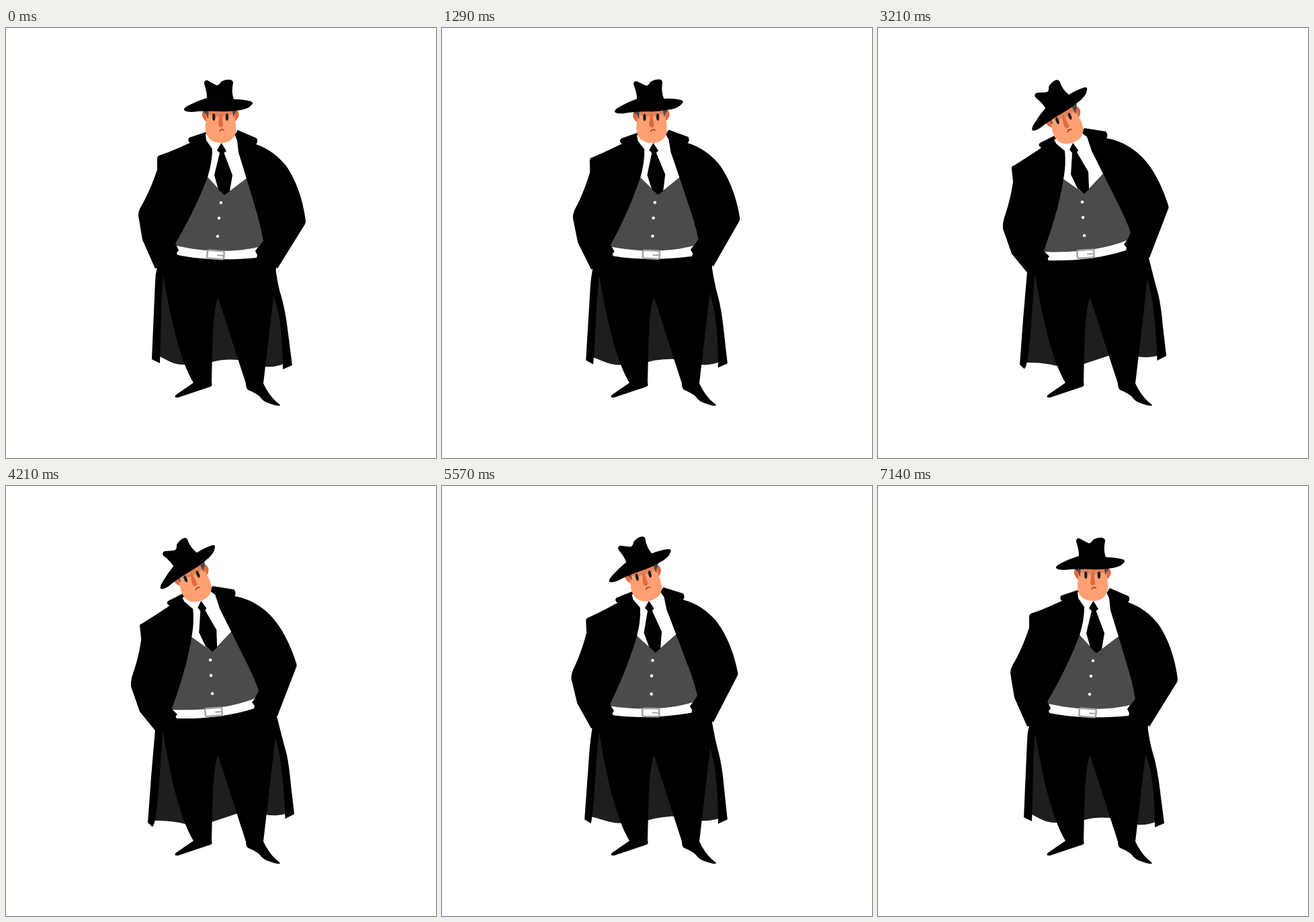
An HTML page that plays this animation: 640x640 px, repeating every 7210 ms.

```html
<!DOCTYPE html>
<html lang="en">
<head>
<meta charset="utf-8">
<title>Man in a black coat</title>
<style>
  html, body { margin: 0; width: 100%; height: 100%; overflow: hidden; background: #fff; }
  svg { display: block; width: 100%; height: 100%; }
</style>
</head>
<body>
<svg viewBox="0 0 640 640">
  <path id="lining" fill="#1e1e1c"/>
  <path id="skirtLeft"/>
  <path id="skirtRight"/>
  <path id="legs" d="M226,345 L226,358 L234,368 C243,420 256,490 279,528 L253,546 Q249,550 256,550 L304,534 Q308,532 306,528
    L307,485 Q308,420 315.500,400 L345,492 L357,529 Q357,537 361,539 Q371,543 377,548 Q383,556 390,558 Q402,563 408,562
    Q408,560 402,556 Q391,546 383,529 L387,495 L398,400 L402,356 L400,345 Z"/>
  <path id="torso"/>
  <path id="shirt" fill="#fff"/>
  <path id="vest" fill="#4b4b4b"/>
  <path id="tie"/>
  <path id="belt" fill="#fff"/>
  <g id="buckle" fill="#fff" stroke="#a3a3a3" stroke-width="2.500" stroke-linecap="round">
    <rect x="-12.500" y="-6" width="25" height="12" rx="2.500"/>
    <path d="M3,0.500 H11" stroke-width="2"/>
  </g>
  <path id="buttons" stroke="#fff" stroke-width="4.600" stroke-linecap="round"/>
  <g id="head">
    <path fill="#e0693d" d="M301,122 Q291,121 292,130 Q294,138 301,141 Z M339,122 Q347,121 346.500,130 Q345,137 339,140 Z"/>
    <path fill="#ffa073" d="M299,115 L298,138 Q296,146 297,153 C299,166 309,171 320,171 C333,171 341,164 342,153 Q343,146 341,138 L340,115 Z"/>
    <path fill="#e2835a" d="M299,115 L299,127 Q319,137 340,127 L340,115 Z"/>
    <path fill="#4b4b4b" d="M294,118 L302,118 L301,135 Q299,134 299,130 Q298,127 294,126 Z M337,118 L345,118 L343,125 Q340,126 339,133 Q337,130 337,118 Z"/>
    <path fill="#dc6a40" d="M319,128 Q316,138 316,144 Q317,148 320,148 Q323,147 323,144 Q322,136 321,128 Z"/>
    <g fill="#1e1e1c">
      <ellipse cx="309.300" cy="132.500" rx="2.200" ry="5.500"/>
      <ellipse cx="329" cy="132.500" rx="2.200" ry="5.500"/>
    </g>
    <path fill="none" stroke="#7a3a22" stroke-width="1.400" stroke-linecap="round" d="M318,153.500 Q320,149.500 324.500,152"/>
    <path id="hat" d="M265,122 Q264,119 272,115 Q286,108 299,104 Q299,94 295,83 Q295,77 300,78 Q307,82 313,85 Q317,86 320,80
      Q327,76 334,77 Q338,78 338,82 Q335,95 339,106 Q353,106 364,109 Q369,111 366,114 Q360,122 342,123 Q328,125 316,124
      Q292,123 277,125 Q267,125 265,122 Z"/>
  </g>
</svg>
<script>
const LOOP = 7210, FRAME = 71.4, LEAN_TIME = 3500, HEAD_DELAY = 310;

// Each part: upright outline, leaning outline.
const torsoParts = {
  torso: [
    `M300,160 L297,155 L273,163 Q269,167 274,171 L269,173 Q248,183 230,189 Q225,190 225,195 L225,211 Q215,241 203,262
     Q197,271 197,279 L203,315 L222,358 L226,357 L234,365 L398,365 L402,356 L404,358 L445,292 Q446,290 446,287 C442,256 432,226 416,204
     C404,190 390,179 372,173 Q376,169 373,164 L345,152 L341,158 Z`,
    `M268,166 L263,160 L241,171 Q237,175 243,178 L239,181 Q221,193 202,205 Q198,206 199,210 L201,229 Q197,256 189,279
     Q185,290 186,299 L199,336 L222,364 L226,366 L234,366 L398,365 L402,342 L404,342 L432,269 Q433,267 432,264 C424,238 411,211 394,193
     C381,180 364,168 340,164 Q343,159 339,154 L307,149 L303,155 Z`],
  shirt: [
    'M297,158 L298,167 L307,180 Q307,200 300,222 L325,249 L358,224 L346,185 L344,167 L340,158 Z',
    'M262,166 L265,172 L278,183 Q280,203 276,225 L307,247 L335,217 L318,183 L311,162 L303,156 Z'],
  vest: [
    'M300,222 Q282,270 252,321 L255,326 C290,337 340,339 374,328 L383,317 Q379,293 370,264 L358,224 L325,249 Z',
    'M276,225 Q269,270 247,331 L250,335 C290,338 335,334 369,320 L376,304 Q368,282 353,253 L335,217 L307,247 Z'],
  tie: [
    'M320.5,171 L328,183 L324.5,186 L337,219 L333,243 L325,249 L316,240 L310,219 L318,186 L314,182 Z',
    'M290,171 L298,182 L296,185 L313,214 L314,240 L307,247 L297,239 L287,218 L289,186 L285,181 Z'],
  belt: [
    'M254,324 C290,333 340,335 375,326 L371,332 L374,338 L373,342 C330,346 290,345 256,338 Q252,336 257,331 Z',
    'M248,333 C290,335 337,330 370,316 L366,322 L370,327 L369,331 C335,342 295,347 254,346 Q251,343 255,340 Z'],
  buttons: [
    'M320,260 L320,260 M317,283 L317,283 M315,310 L315,310',
    'M304,259 L304,259 M305,282 L305,282 M307,309 L307,309']
};
const skirtParts = {
  lining: [
    'M230,364 L226,410 L224,488 L229,489 C240,494 250,502 266,501 L307,497 C320,493 335,493 346,494 L386,504 C397,505 405,503 413,500 L419,498 L413,440 L401,385 Z',
    'M230,366 L225,420 L220,498 L225,498 C240,498 252,499 268,503 L308,500 C320,496 332,492 344,488 L388,489 C398,491 407,490 417,488 L423,486 L416,425 L404,368 Z'],
  skirtLeft: [
    'M236,350 L225,357 Q222,367 222,378 L217,493 L229,499 Q230,470 231,410 L234,368 Z',
    'M236,355 L222,363 Q220,390 217,430 L212.5,501 Q219,507 225.5,508 L230,420 L233,370 Z'],
  skirtRight: [
    'M395,345 L401,357 Q405,385 409,397 Q416,420 420,455 L426,502 L412,508 Q412,470 408,440 Q406,420 398,398 Z',
    'M395,335 L403,342 Q411,374 418,398 Q422,415 425,445 L430.5,488 L417,495 Q415,450 411,425 Q409,400 400,371 Z']
};
const swayKeys = [[0, 0], [1290, -2], [2210, 3], [3210, -1.5], [5000, -1.5], [6210, -5], [7140, -5.5]];

const byId = id => document.getElementById(id);
const mix = (a, b, k) => a + (b - a) * k;
const clamp = x => Math.min(1, Math.max(0, x));
const easeCubic = x => x < 0.5 ? 4 * x ** 3 : 1 - 4 * (1 - x) ** 3;
const smooth = x => x * x * (3 - 2 * x);

// Goes out, rests briefly, and comes back.
function lean(t, delay = 0) {
  const out = easeCubic(clamp((t - delay) / LEAN_TIME));
  const back = easeCubic(clamp((LOOP - t + delay) / LEAN_TIME));
  return Math.min(out, back);
}

function sway(t) {
  const i = Math.max(1, swayKeys.findIndex(key => key[0] >= t));
  const [t0, a] = swayKeys[i - 1], [t1, b] = swayKeys[i];
  return mix(a, b, smooth((t - t0) / (t1 - t0)));
}

function drawParts(parts, k, shift = 0) {
  const pair = /([\d.]+),([\d.]+)/g;
  for (const [id, [from, to]] of Object.entries(parts)) {
    const ends = [...to.matchAll(pair)];
    let i = 0;
    byId(id).setAttribute('d', from.replace(pair, (_, x, y) => {
      const end = ends[i++];
      const py = mix(+y, +end[2], k);
      const px = mix(+x, +end[1], k) + shift * Math.max(0, py - 360) / 140;
      return px.toFixed(2) + ',' + py.toFixed(2);
    }));
  }
}

function render(time) {
  const frame = Math.floor((time % LOOP + 3) / FRAME);
  const t = frame >= 100 ? 0 : frame * FRAME;   // the last frame snaps back to the start
  const body = lean(t);
  const tilt = lean(t, HEAD_DELAY);

  drawParts(skirtParts, body, sway(t));
  drawParts(torsoParts, body);
  byId('buckle').setAttribute('transform',
    `translate(${mix(312, 309, body)} ${mix(337.5, 336.3, body)}) rotate(${mix(4, -4, body)})`);
  byId('head').setAttribute('transform',
    `translate(${-37 * body} ${body}) rotate(${-20.5 * tilt} 319.5 150)`);
  byId('hat').setAttribute('transform',
    `translate(${2.5 * tilt} ${0.4 * tilt}) rotate(${-12.5 * tilt} 317 117)`);
}

const start = performance.now();
function tick() {
  render(performance.now() - start);
  requestAnimationFrame(tick);
}
tick();
</script>
</body>
</html>
```
